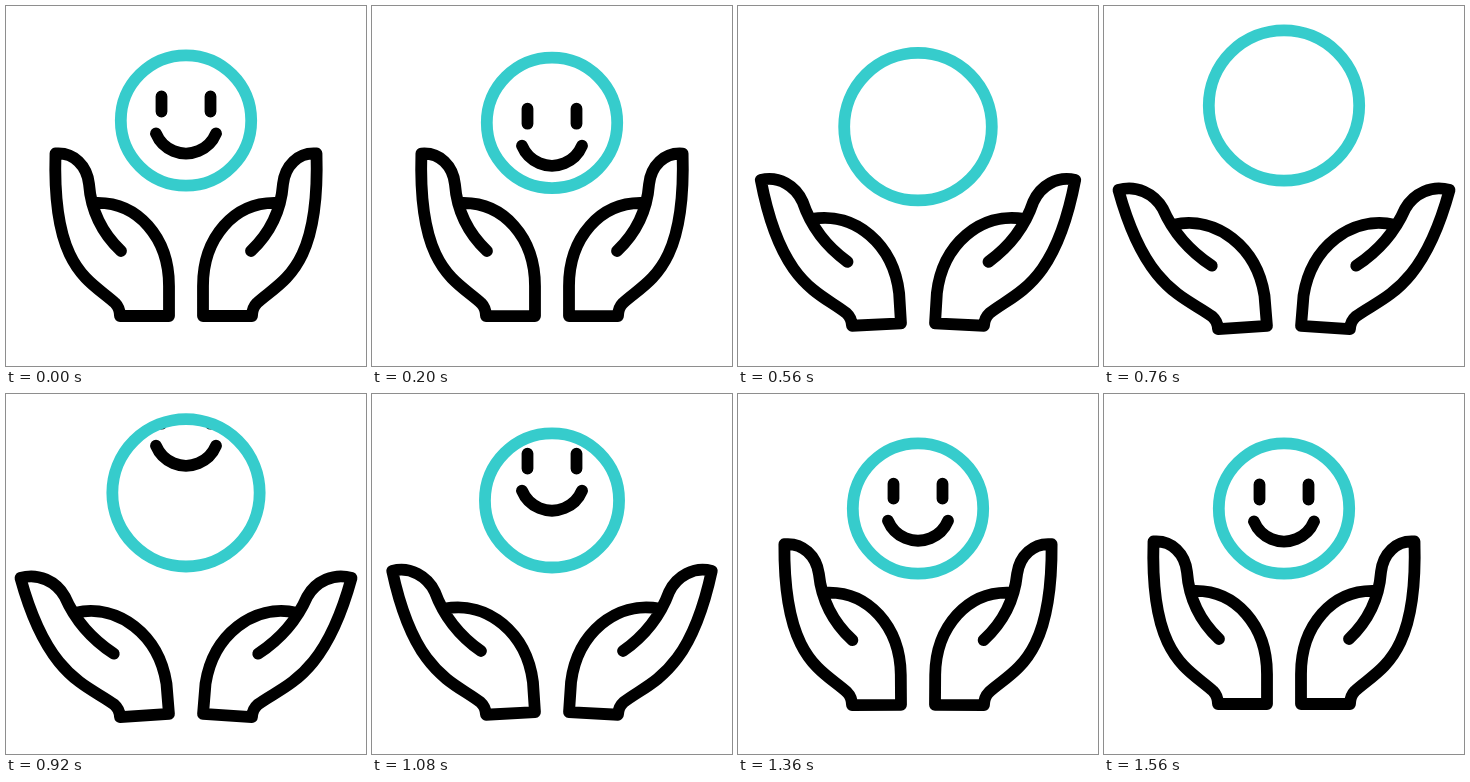
An HTML page with a canvas for the animation above (1720 ms loop, 360 px wide and 360 px high).

```html
<!DOCTYPE html>
<html lang="en">
<head>
<meta charset="utf-8">
<title>Hands and smile</title>
<style>
  html, body { margin: 0; width: 100%; height: 100%; overflow: hidden; background: #fff; }
  canvas { display: block; width: 100vmin; height: 100vmin; }
</style>
</head>
<body>
<canvas id="stage"></canvas>
<script>
const SIZE = 360, LOOP = 1720, STEP = 40, CENTER = SIZE / 2;
const REST_Y = 114.5, REST_RADIUS = 65.2;
const canvas = document.getElementById('stage');
const ctx = canvas.getContext('2d');
const scale = window.devicePixelRatio || 1;
canvas.width = canvas.height = SIZE * scale;

// Progress from 0 to 1 between two times, eased at both ends.
function ease(t, from, to) {
  const x = Math.min(1, Math.max(0, (t - from) / (to - from)));
  return x ** 3 * (10 - 15 * x + 6 * x * x);
}

const handOpen = t => ease(t, 155, 790) - ease(t, 890, 1500);
const ballRadius = t => REST_RADIUS + 10 * (ease(t, 186, 706) - ease(t, 800, 1210));

// The ball sinks, is thrown up, then settles.
const ballY = t => REST_Y + 12.5 * ease(t, 60, 500)
  - 28.6 * ease(t, 420, 830) + 16.1 * ease(t, 850, 1310);

// The face leaves the ball at the bottom and comes back in from the top.
function faceShift(t) {
  if (t < 60 || t >= 1500) return 0;
  return t < 680 ? 34 * ((t - 60) / 260) ** 2 : -23 * ((1500 - t) / 421) ** 3;
}

// Bends a point of the left hand about the wrist, more strongly towards the fingertips.
function bend(x, y, open) {
  const dx = x - 139, dy = y - 310;
  const reach = Math.max(0, -dy / 162) ** 1.3;
  const angle = open * (3.6 + 9.7 * reach) * Math.PI / 180;
  const cos = Math.cos(angle), sin = Math.sin(angle);
  return [139 + dx * cos + dy * sin, 310 + 11.5 * open + dy * cos - dx * sin];
}

function drawHand(open) {
  const at = (x, y) => bend(x, y, open);
  const curve = (a, b, c) => ctx.bezierCurveTo(...at(...a), ...at(...b), ...at(...c));
  ctx.beginPath();
  // Palm and wrist
  ctx.moveTo(...at(88, 197));
  curve([132, 195], [163, 232], [163, 280]);
  ctx.lineTo(...at(163, 310));
  ctx.lineTo(...at(114, 310));
  ctx.quadraticCurveTo(...at(114, 302), ...at(109, 297));
  // Back of the hand, fingers, inner line
  curve([84, 274], [46, 264], [49.5, 147.5]);
  curve([68, 146], [81, 160], [83, 178]);
  curve([85, 204], [96, 227], [115, 245]);
  ctx.stroke();
}

function drawFace(shift) {
  ctx.beginPath();
  for (const side of [-1, 1]) {
    ctx.moveTo(CENTER + 24.5 * side, 90.5 + shift);
    ctx.lineTo(CENTER + 24.5 * side, 105.5 + shift);
  }
  ctx.stroke();
  ctx.beginPath();
  ctx.arc(CENTER, 115 + shift, 32.5, 0.395, Math.PI - 0.395);
  ctx.stroke();
}

function drawBall(t) {
  const y = ballY(t);
  const ring = new Path2D();
  ring.arc(CENTER, y, ballRadius(t), 0, 2 * Math.PI);
  ctx.save();
  ctx.clip(ring);
  drawFace(y - REST_Y + faceShift(t));
  ctx.restore();
  ctx.strokeStyle = '#36cccc';
  ctx.stroke(ring);
}

function draw(now) {
  const t = Math.floor((now % LOOP) / STEP) * STEP;
  ctx.setTransform(scale, 0, 0, scale, 0, 0);
  ctx.fillStyle = '#fff';
  ctx.fillRect(0, 0, SIZE, SIZE);
  ctx.lineWidth = 11.8;
  ctx.lineCap = ctx.lineJoin = 'round';
  ctx.strokeStyle = '#000';
  const open = handOpen(t);
  drawHand(open);
  ctx.save();
  ctx.translate(SIZE, 0);
  ctx.scale(-1, 1);
  drawHand(open);
  ctx.restore();
  drawBall(t);
}

let start;
function tick(now) {
  start ??= now;
  draw(now - start);
  requestAnimationFrame(tick);
}
draw(0);
requestAnimationFrame(tick);
</script>
</body>
</html>
```
